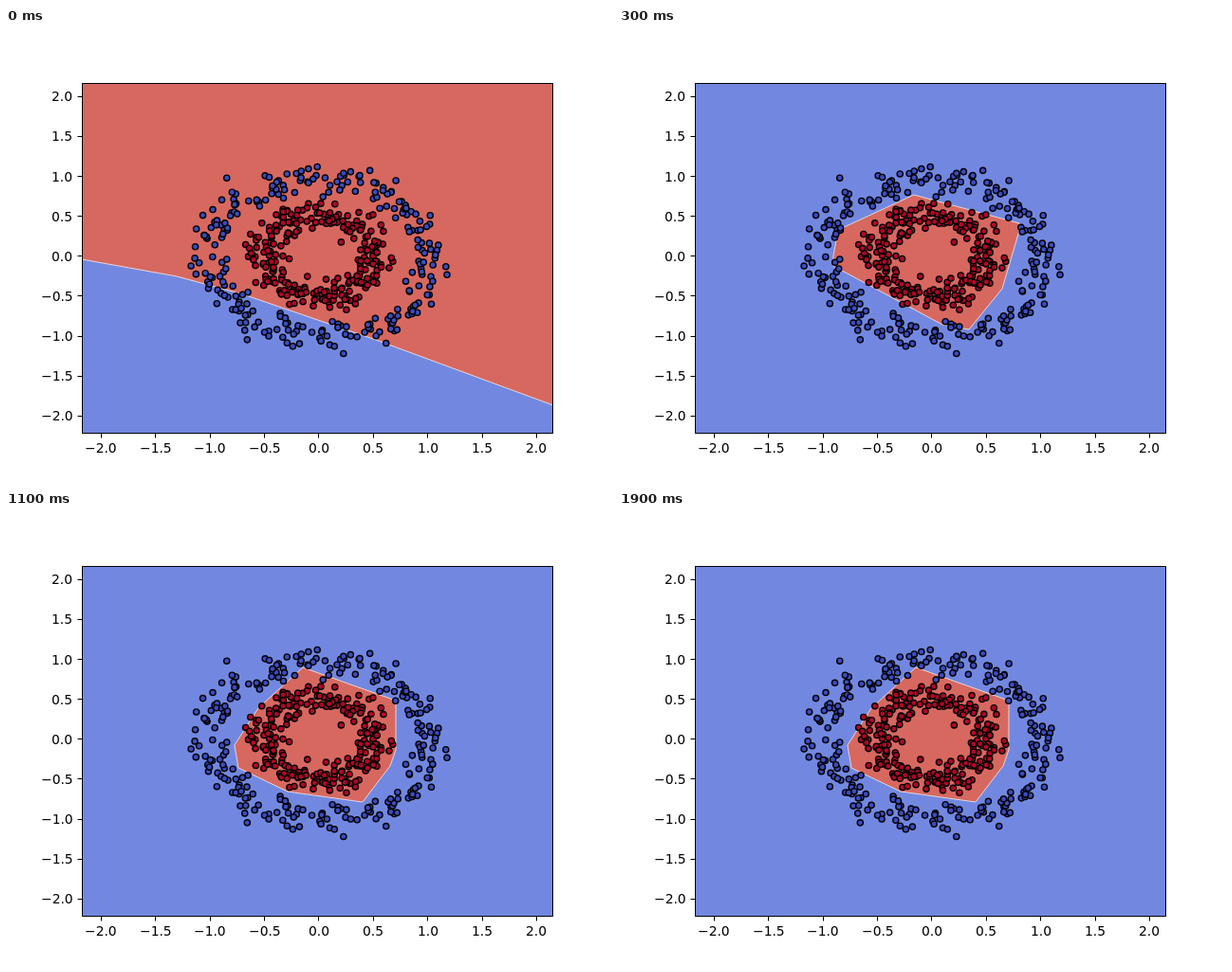
Animation of 640x480 px, one loop 2 s. Source, as an HTML page with a canvas:

```html
<!DOCTYPE html>
<html>
<head>
<meta charset="utf-8">
<style>
  html, body { margin: 0; width: 100%; height: 100%; overflow: hidden; background: #fff; }
  canvas { display: block; }
</style>
</head>
<body>
<canvas id="plot" width="640" height="480"></canvas>
<script>
const ctx = document.getElementById('plot').getContext('2d');
const LOOP = 2000, STEP = 100;
const BLUE = '#3b4cc0', RED = '#b40426';
const BLUE_AREA = '#7288e0', RED_AREA = '#d76860', EDGE = '#e6d5d8';
const LEFT = 80.5, TOP = 58.5, RIGHT = 576.5, BOTTOM = 427.5;
const px = x => 329.9 + x * 114.8;
const py = y => 240.8 - y * 84.3;

// Corners of the red region: untrained, then a band that closes and settles.
const untrained = [[80, 244], [180, 262], [250, 281], [390, 329], [577, 398], [577, 58], [80, 58]];
const band = [[125, 121], [385, 220], [577, 296], [577, 428], [522, 428], [378, 335], [210, 245], [80, 182], [80, 99]];
const closed = [[311, 176], [422, 206], [422, 214], [404, 275], [369, 318], [341, 313], [226, 251], [226, 240], [231, 213]];
const settled = [[313, 165], [411, 200], [411, 252], [405, 269], [376, 307], [297, 296], [245, 271], [241, 247], [266, 208]];

const mix = (a, b, k) => a.map(([x, y], i) => [x + (b[i][0] - x) * k, y + (b[i][1] - y) * k]);
const easeOut = k => 1 - (1 - k) ** 8;

function regionAt(t) {
  if (t < 100) return untrained;
  if (t < 300) return mix(band, closed, (t - 100) / 200);
  return mix(closed, settled, easeOut((t - 300) / 1600));
}

let seed = 11;
function random() {
  seed = (seed + 0x6d2b79f5) | 0;
  let n = Math.imul(seed ^ (seed >>> 15), seed | 1);
  n ^= n + Math.imul(n ^ (n >>> 7), n | 61);
  return ((n ^ (n >>> 14)) >>> 0) / 4294967296;
}
const noise = sd => (random() + random() + random() - 1.5) * 2 * sd;

function ring(count, radius, color) {
  return Array.from({ length: count }, (_, i) => {
    const angle = i / count * 2 * Math.PI;
    return {
      x: px(radius * Math.cos(angle) + noise(0.09)),
      y: py(radius * Math.sin(angle) + noise(0.09)),
      color
    };
  });
}
const dots = [...ring(250, 1, BLUE), ...ring(250, 0.5, RED)];

function drawRegion(corners) {
  ctx.save();
  ctx.beginPath();
  ctx.rect(LEFT, TOP, RIGHT - LEFT, BOTTOM - TOP);
  ctx.clip();
  ctx.fillStyle = BLUE_AREA;
  ctx.fill();
  ctx.beginPath();
  for (const [x, y] of corners) ctx.lineTo(x, y);
  ctx.closePath();
  ctx.fillStyle = RED_AREA;
  ctx.fill();
  ctx.strokeStyle = EDGE;
  ctx.lineWidth = 1;
  ctx.stroke();
  ctx.restore();
}

function drawDots() {
  ctx.strokeStyle = '#000';
  ctx.lineWidth = 1.4;
  for (const { x, y, color } of dots) {
    ctx.beginPath();
    ctx.arc(x, y, 3.1, 0, 2 * Math.PI);
    ctx.fillStyle = color;
    ctx.fill();
    ctx.stroke();
  }
}

function drawAxes() {
  ctx.strokeStyle = ctx.fillStyle = '#000';
  ctx.lineWidth = 1;
  ctx.strokeRect(LEFT, TOP, RIGHT - LEFT, BOTTOM - TOP);
  ctx.font = '13.89px "DejaVu Sans", sans-serif';
  ctx.beginPath();
  for (let v = -2; v <= 2; v += 0.5) {
    const label = v.toFixed(1).replace('-', '\u2212');
    const width = ctx.measureText(label).width;
    const x = Math.floor(px(v)) + 0.5, y = Math.floor(py(v)) + 0.5;
    ctx.moveTo(x, BOTTOM);
    ctx.lineTo(x, BOTTOM + 5);
    ctx.moveTo(LEFT, y);
    ctx.lineTo(LEFT - 5, y);
    ctx.fillText(label, Math.round(px(v) - width / 2), 448);
    ctx.fillText(label, Math.round(70.3 - width), Math.round(py(v)) + 5);
  }
  ctx.stroke();
}

const start = performance.now();
function draw() {
  const elapsed = Math.max(0, performance.now() - start) % LOOP;
  ctx.fillStyle = '#fff';
  ctx.fillRect(0, 0, 640, 480);
  drawRegion(regionAt(Math.floor(elapsed / STEP) * STEP));
  drawDots();
  drawAxes();
  requestAnimationFrame(draw);
}
draw();
</script>
</body>
</html>
```
